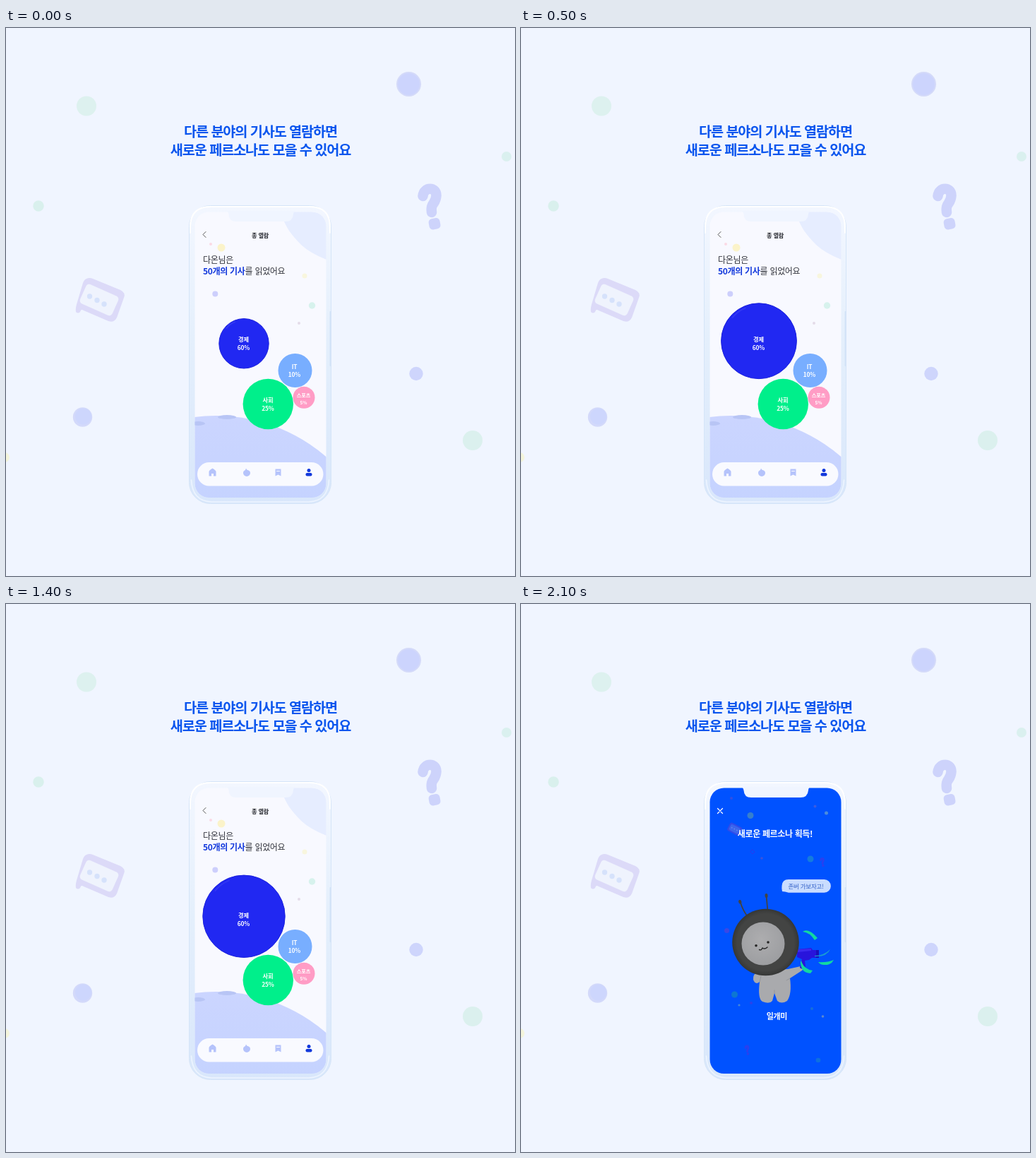
An HTML page that plays this animation: 721 by 776 pixels, repeating every 4.1 s.

```html
<!DOCTYPE html>
<html lang="ko">
<head>
<meta charset="utf-8">
<title>Persona</title>
<style>
html, body { margin: 0; width: 100%; height: 100%; overflow: hidden; background: #f0f5ff; }
svg { display: block; width: 721px; height: 776px; }
text { font-family: "Noto Sans CJK KR", "Noto Sans CJK", "Noto Sans", sans-serif; }
.mid { text-anchor: middle; }
.bold { font-weight: 700; }
.heading { font-size: 19.7px; letter-spacing: -1.13px; fill: #0a55ee; }
.intro { font-size: 12px; letter-spacing: -.3px; fill: #30323a; }
.labels { font-size: 8.3px; letter-spacing: -.1px; fill: #fff; }
.line { fill: none; stroke-linecap: round; stroke-linejoin: round; }
</style>
</head>
<body>
<svg viewBox="0 0 721 776">
  <defs>
    <linearGradient id="case" x2="0" y2="1">
      <stop stop-color="#f3f7ff"/><stop offset=".45" stop-color="#e4effc"/><stop offset="1" stop-color="#d9e7fb"/>
    </linearGradient>
    <linearGradient id="planet" x2="0" y2="1">
      <stop stop-color="#cbd5ff"/><stop offset=".25" stop-color="#c5d3ff"/>
    </linearGradient>
    <radialGradient id="tire">
      <stop offset=".85" stop-color="#434443"/><stop offset="1" stop-color="#363736"/>
    </radialGradient>
    <radialGradient id="skin" cx=".45" cy=".4" r=".6">
      <stop stop-color="#adadaf"/><stop offset="1" stop-color="#9d9ea1"/>
    </radialGradient>
    <clipPath id="display"><rect x="267.5" y="260.5" width="186" height="404.5" rx="20"/></clipPath>
    <g id="question">
      <path class="line" stroke="currentColor" stroke-width="14.5" d="M590.5 238C592 224 609.500 225 609.500 237C609 250 601 247 603 261"/>
      <rect x="599" y="269.5" width="16" height="15.5" rx="5" fill="currentColor" transform="rotate(-10 607 277)"/>
    </g>
  </defs>

  <g id="backdrop"></g>
  <use href="#question" color="#cdd3fb"/>
  <path fill="#dcdaf8" d="M114 355Q118 353 123 355L162 371Q170 375 167 382L157 410Q153 418 145 415L110 400Q106 397 105 402Q102 405 99 402Q98 397 101 388L109 361Q111 356 114 355Z"/>
  <g transform="translate(132 385) rotate(24)">
    <rect x="-25" y="-15" width="50" height="30" rx="5" fill="#eff3fd"/>
  </g>
  <g fill="#d6e2fb"><circle cx="118.5" cy="380" r="3.7"/><circle cx="129" cy="385.500" r="3.7"/><circle cx="139" cy="391" r="3.7"/></g>

  <text class="heading bold mid" x="360.5" y="154.3">다른 분야의 기사도 열람하면</text>
  <text class="heading bold mid" x="360.5" y="179.6">새로운 페르소나도 모을 수 있어요</text>

  <rect x="259.5" y="251.5" width="201" height="422" rx="30" fill="url(#case)" stroke="#d5e5f8"/>
  <path class="line" stroke="#fff" stroke-width="2" d="M261 290V282Q261 253 290 253H430Q459 253 459 282V290"/>
  <path class="line" stroke="#eef5ff" stroke-width="1.5" d="M262.5 640Q264 670 291 671H429Q456 670 457.5 640"/>
  <path class="line" stroke="#d3e4f7" stroke-width="2" d="M459.5 402V478"/>

  <g clip-path="url(#display)">
    <g id="stats">
      <rect x="267" y="260" width="187" height="406" fill="#f8f9ff"/>
      <path fill="#e6edff" d="M390 260C394 282 406 294 418 307Q431 319 454 328V260Z"/>
      <circle cx="297" cy="789" r="240" fill="url(#planet)"/>
      <g fill="#b8c5f5"><ellipse cx="313" cy="551" rx="13" ry="3"/><ellipse cx="272" cy="560" rx="10" ry="3"/></g>
      <g id="statsDots"></g>
      <path class="line" stroke="#555" d="M283 288.5L279 292.5L283 296.5"/>
      <text class="bold mid" x="360" y="296.5" font-size="8.2" letter-spacing="-.2" fill="#24262c">총 열람</text>
      <text class="intro" x="279" y="333">다온님은</text>
      <text class="intro" x="279" y="349"><tspan class="bold" fill="#1238dc">50개의 기사</tspan>를 읽었어요</text>

      <circle id="economy" cx="337" fill="#2128f2" stroke="#1a20dc"/>
      <path id="shine" class="line" stroke="#3439f4" stroke-width="1.5"/>
      <circle cx="409.5" cy="485" r="24" fill="#78aeff"/>
      <circle cx="371.3" cy="532.5" r="35.7" fill="#00ef8b"/>
      <circle cx="422" cy="523.3" r="15.5" fill="#ff9cc5"/>
      <g class="labels bold mid">
        <text x="336.5" y="444">경제</text><text x="336.5" y="455.5">60%</text>
        <text x="408.5" y="482.5">IT</text><text x="408.5" y="494">10%</text>
        <text x="371" y="530">사회</text><text x="371" y="541.5">25%</text>
        <text x="421.5" y="523" font-size="7.2">스포츠</text><text x="421.5" y="533" font-size="6.5">5%</text>
      </g>

      <rect x="271" y="615" width="178.5" height="33.5" rx="16.7" fill="#f9faff"/>
      <g fill="#b5c3fb">
        <path d="M287.5 628Q288 626 292.5 623.5Q297 626 297.5 628V634.5H294V631H291V634.5H287.5Z"/>
        <path d="M340 623.5Q341 626 342.5 626Q346 627 346 630A5 5 0 0 1 336 630Q336 627 339 626Z"/>
        <path d="M381.5 624.5H389.5V634.5L385.5 632.5L381.5 634.5Z"/>
        <path class="line" stroke="#f9faff" d="M383.5 627.5H387.5"/>
      </g>
      <g fill="#1238dc"><circle cx="429" cy="626.5" r="2.5"/><rect x="424.5" y="630" width="9" height="4.5" rx="2"/></g>
    </g>

    <g id="reward">
      <rect x="267" y="260" width="187" height="406" fill="#0052ff"/>
      <g id="rewardDots"></g>
      <g transform="translate(302 319) rotate(27)">
        <rect x="-9" y="-7" width="19" height="13" rx="3" fill="#314ae8"/>
        <rect x="-7" y="-5" width="15" height="9" rx="2" fill="#3b66ed"/>
        <path class="line" stroke="#6888ed" stroke-width="1.8" stroke-dasharray="0 4" d="M-4-.5H5"/>
      </g>
      <use href="#question" color="#2940ef" transform="translate(306.5 315) scale(.2)"/>
      <use href="#question" color="#2940ef" transform="translate(200 576) scale(.2 .22)"/>
      <path class="line" stroke="#2939ed" d="M328 348L331 351L328 354L325 351Z"/>
      <path class="line" stroke="#fff" stroke-width="1.2" d="M278.5 289.5L285.5 296.5M285.5 289.5L278.5 296.5"/>
      <text class="bold mid" x="360" y="329.5" font-size="12" letter-spacing="-.35" fill="#fff">새로운 페르소나 획득!</text>
      <path fill="#c9dcff" d="M379 390H429.5A9.4 9.4 0 0 1 429.5 408.8H379Q374 407 370 407Q369 403 369.5 399Q370 390 379 390Z"/>
      <text class="mid" x="403.5" y="402.5" font-size="8.5" letter-spacing="-.25" fill="#315fc6">존버 가보자고!</text>

      <path fill="#a9aaad" d="M338 520Q328 523 329 532Q332 540 338 535Q335 559 342 563Q352 567 356 562L359 551L363 562Q369 567 377 562Q384 552 381 530L398 519Q402 515 396 513L378 517Z"/>
      <path class="line" stroke="#909195" stroke-width=".8" d="M338 535L340 527M359 551V547M381 530L376 533"/>
      <g class="line" stroke="#424342" stroke-width="1.8">
        <path d="M322 444Q314 434 310.5 421.5M349.5 435L347.5 413"/>
        <path stroke-width="4" d="M310 421L310.5 422.5M347.5 412L347.6 414"/>
      </g>
      <path fill="#2814dc" d="M391 489L411 487L413 490L422 490V501L412 501L408 504L402 505L403 514Q399 519 395 515L398 503L391 500Z"/>
      <path fill="#3c29ed" d="M392 489L411 488V491L392 493Z"/>
      <path fill="#180fba" d="M418 490H422V501H418Z"/>
      <circle cx="346.5" cy="479" r="47.3" fill="url(#tire)"/>
      <circle cx="343" cy="481" r="30.5" fill="url(#skin)"/>
      <g fill="#242424"><circle cx="333" cy="483.7" r="1.8"/><circle cx="350" cy="479" r="1.8"/></g>
      <path class="line" stroke="#242424" stroke-width="1.4" d="M337.5 489.5Q340.5 491 342 487Q345 489.5 349 486"/>
      <g fill="#12d8a0">
        <path d="M399 464Q407 458 420 473L416 476Q409 465 399 464Z"/>
        <path d="M397 505Q400 517 413 519L410 523Q396 522 396 507Z"/>
        <path d="M421 507Q433 508 443 504Q439 512 429 511Q424 511 421 507Z"/>
        <path fill="#1a9fd0" d="M416 498Q429 498 438 489Q433 500 416 499Z"/>
      </g>
      <text class="bold mid" x="362.3" y="588" font-size="11" letter-spacing="-.4" fill="#fff">일개미</text>
    </g>
  </g>
  <path fill="#f0f5ff" d="M312 259H410Q407 260 407 264Q406 274 396 274H326Q316 274 315.5 264Q315 260 312 259Z"/>
</svg>

<script>
const byId = id => document.getElementById(id);

// Each dot: x, y, radius, colour
function addDots(id, dots) {
  byId(id).innerHTML = dots.map(([x, y, r, fill]) =>
    `<circle cx="${x}" cy="${y}" r="${r}" fill="${fill}"/>`).join('');
}

addDots('backdrop', [
  [114, 110.5, 14, '#ddf1ef'], [570.5, 79.5, 17.5, '#d4daf9'], [570.5, 79.5, 15.5, '#ccd4fd'],
  [709, 182, 7, '#daf0ef'], [46, 252, 7.7, '#d9f0ed'], [581, 489.5, 9.7, '#ced5fc'],
  [108.5, 551, 13.7, '#d3d9fa'], [109.5, 550, 11.5, '#cdd6fd'], [661, 584, 14, '#dbf0ee'],
  [-2, 608, 7, '#f4f5dc']
]);
addDots('statsDots', [
  [305, 311, 5.5, '#fbf3c9'], [290, 306, 2, '#fbdae5'], [296.3, 376.5, 4, '#cdcffc'],
  [423, 351, 3.5, '#f8f6de'], [433.5, 393, 4.7, '#d7f2ed'], [415, 418, 2, '#e4dce9']
]);
addDots('rewardDots', [
  [325, 299.5, 4.5, '#377fcd'], [298, 275, 2, '#3050e6'], [416.5, 286.5, 2, '#3b5ce1'],
  [432.5, 296, 2.5, '#4b8cdc'], [410, 361, 4.5, '#147cdc'], [341, 360, 1.8, '#3b54dc'],
  [291.5, 462.5, 3.5, '#3a47e5'], [302.5, 553, 4.5, '#0d77d2'], [309, 568, 1.6, '#4586d8'],
  [326, 565, 2, '#2a43eb'], [412, 573, 2, '#156fdb'], [427.5, 584, 1.8, '#5b88cf'],
  [421, 646, 3.3, '#0d70df']
]);

const LOOP = 4100, STEP = 100, GROW = 800, REVEAL = 2000;

function draw(now) {
  const time = Math.floor((now % LOOP) / STEP) * STEP;
  const grown = 1 - (1 - Math.min(time / GROW, 1)) ** 1.6;
  const r = 35.2 + 23 * grown, y = 446.8 - 4.5 * grown;
  byId('economy').setAttribute('r', r);
  byId('economy').setAttribute('cy', y);
  byId('shine').setAttribute('d', `M${337 - r * .7} ${y - r * .62}Q${337 - r * .55} ${y - r * .8} ${337 - r * .36} ${y - r * .87}`);
  byId('stats').style.display = time < REVEAL ? '' : 'none';
  byId('reward').style.display = time < REVEAL ? 'none' : '';
}

const start = performance.now();
function tick() {
  draw(performance.now() - start);
  requestAnimationFrame(tick);
}
tick();
</script>
</body>
</html>
```
